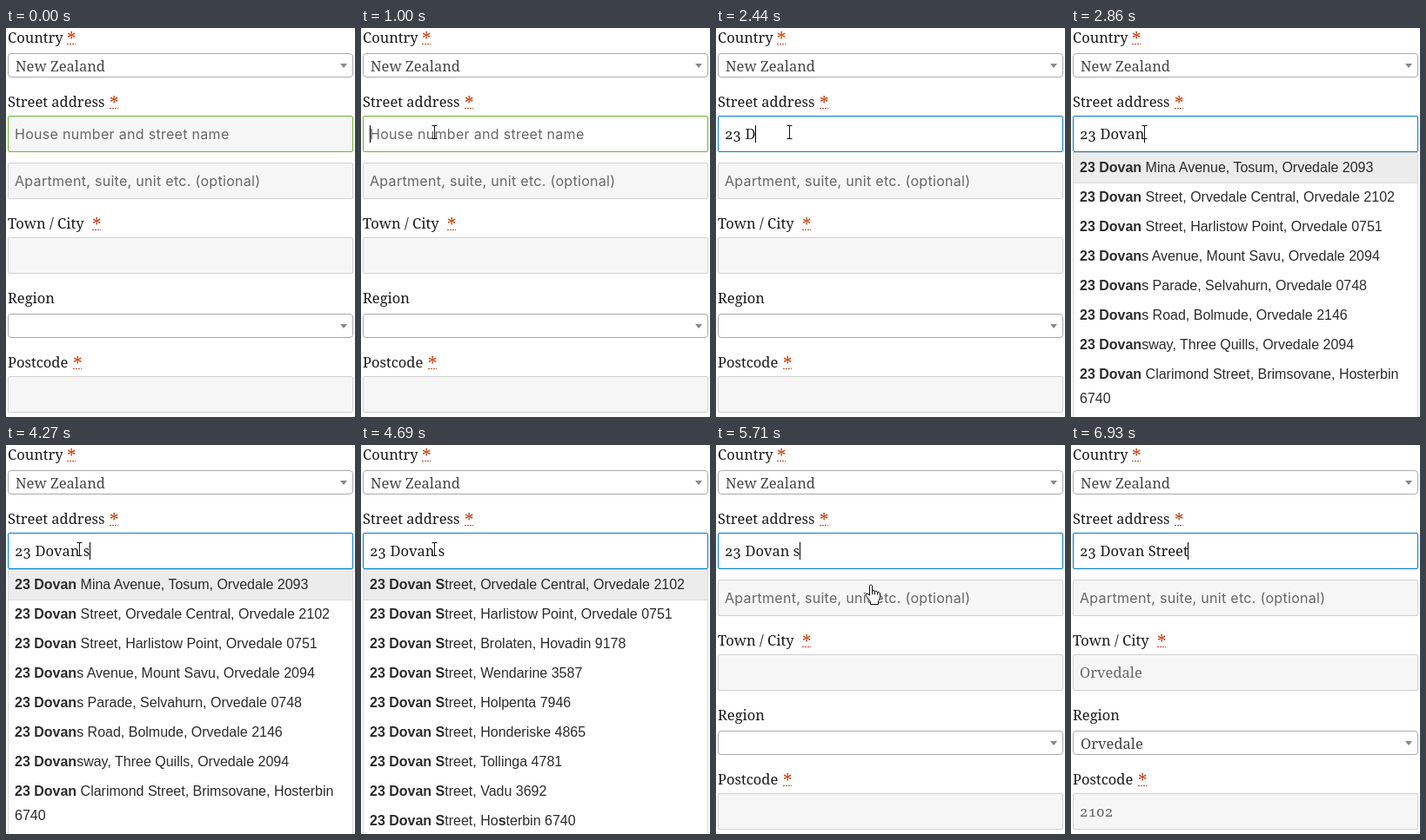
Recreate the animation shown at these times as an HTML page. Size 401 by 448 pixels, loop 7330 ms.

```html
<!DOCTYPE html>
<html lang="en">
<head>
<meta charset="utf-8">
<title>Address autocomplete</title>
<style>
  html, body { margin: 0; width: 100%; height: 100%; overflow: hidden; background: #fff; }
  svg { display: block; }
  text { white-space: pre; }
  .serif { font: 16.5px "Noto Serif", serif; font-variant-numeric: oldstyle-nums; }
  .hint { font: 16px Inter, sans-serif; letter-spacing: .3px; fill: #666; }
  .row { font: 16px "Liberation Sans", Arial, sans-serif; fill: #2b2b2b; }
  .star { font: 500 21px "Noto Serif", serif; fill: #c0400f; }
</style>
</head>
<body>
<svg id="stage" width="401" height="448" viewBox="0 0 401 448"></svg>
<script>
const LOOP = 7330;
const stage = document.getElementById('stage');

const typed = '23 Dovan';
const broadRows = [
  '*23 Dovan* Mina Avenue, Tosum, Orvedale 2093',
  '*23 Dovan* Street, Orvedale Central, Orvedale 2102',
  '*23 Dovan* Street, Harlistow Point, Orvedale 0751',
  '*23 Dovan*s Avenue, Mount Savu, Orvedale 2094',
  '*23 Dovan*s Parade, Selvahurn, Orvedale 0748',
  '*23 Dovan*s Road, Bolmude, Orvedale 2146',
  '*23 Dovan*sway, Three Quills, Orvedale 2094',
  '*23 Dovan* Clarimond Street, Brimsovane, Hosterbin',
];
const streetRows = [
  'Orvedale Central, Orvedale 2102', 'Harlistow Point, Orvedale 0751',
  'Brolaten, Hovadin 9178', 'Wendarine 3587', 'Holpenta 7946',
  'Honderiske 4865', 'Tollinga 4781', 'Vadu 3692', 'Ho*s*terbin 6740',
].map(place => '*23 Dovan S*treet, ' + place);

// Each step keeps the values of the one before it.
const steps = [
  [0, { value: '', border: '#6cb52d', fill: '#f6f6f6' }],
  [200, { beam: [112, 157] }],
  [400, { beam: [99, 138] }],
  [600, { beam: [90, 116] }],
  [800, { beam: [85, 106] }],
  [1000, { beam: [84, 120], fill: '#fff', caret: true }],
  [1620, { value: '2', border: '#007acc' }],
  [1820, { value: '23' }],
  [2220, { value: '23 ' }],
  [2440, { value: '23 D' }],
  [2650, { value: '23 Dov' }],
  [2860, { value: typed, rows: broadRows }],
  [3060, { caret: false }],
  [3480, { caret: true }],
  [4080, { value: typed + ' ' }],
  [4270, { value: typed + ' s' }],
  [4690, { rows: streetRows, caret: false }],
  [5090, { beam: [104, 130], caret: true }],
  [5300, { beam: null, hand: [140, 152] }],
  [5500, { hand: [171, 160] }],
  [5710, { rows: null }],
  [5910, { value: typed + ' Street', filled: true, caret: false }],
  [6320, { caret: true }],
  [6520, { hand: null }],
  [6730, { caret: false }],
  [6930, { caret: true }],
];
let last = {};
const scenes = steps.map(([start, change]) => ({ start, ...(last = { ...last, ...change }) }));

const text = (x, y, kind, str, color = '') =>
  `<text x="${x}" y="${y}" class="${kind}"${color && ` fill="${color}"`}>${str}</text>`;

const box = (y, h, fill, border, r) =>
  `<rect x="2.5" y="${y + .5}" width="396" height="${h - 1}" rx="${r}" fill="${fill}" stroke="${border}"/>`;

const field = (y, fill = '#f6f6f6', border = '#d1d1d1') => box(y, 42, fill, border, 1.5);

const select = (y, value) => box(y, 28, '#fff', '#aaa', 3.5)
  + `<path d="M384 ${y + 12}h8l-4 5z" fill="#888"/>` + text(11, y + 21, 'serif', value, '#444');

function label(y, name, starX) {
  const star = starX ? text(starX, y + 4, 'star', '*')
    + `<path d="M${starX} ${y + 1.5}h10" stroke="#c0400f" stroke-dasharray="2 1"/>` : '';
  return text(2, y, 'serif', name, '#1a1a1a') + star;
}

function dropdown(rows) {
  const bold = row => row.replace(/\*(.+?)\*/g, '<tspan font-weight="700">$1</tspan>');
  return '<path d="M2.5 449V143.5H398.5V449" fill="#fff" stroke="#d6d6d6"/>'
    + '<path d="M3 144h395v34H3z" fill="#ececec"/><path d="M3 178.5h395" stroke="#ddd"/>'
    + rows.map((row, i) => text(10, 166 + 34 * i, 'row', bold(row))).join('')
    + (rows === broadRows ? text(10, 432, 'row', '6740') : '');
}

const beam = ([x, y]) =>
  `<path d="M${x - 2.5} ${y - 7.5}h6m-3 0v15m-3 0h6" fill="none" stroke="#111"/>`;

const hand = ([x, y]) => `<path transform="translate(${x} ${y})" fill="#fff" stroke="#111"
  stroke-linejoin="round" d="M5.5 13V2Q7 -.5 8.5 2V8Q10 6 11.5 8.5Q13 7 14.5 9.5Q16.5 8.5 17.5 11
  V16L15.5 20V23.5H6.5V20.5L1.5 14Q0 11.5 2 11Q3.5 11 5.5 13.5M8.5 8v4M11.5 8.5v4M14.5 9.5v3"/>`;

function draw(s) {
  const { filled } = s;
  stage.innerHTML = label(17, 'Country', 70) + select(29, 'New Zealand')
    + label(91, 'Street address', 119) + field(101, s.fill, s.border)
    + (s.value ? '' : text(10, 128, 'hint', 'House number and street name'))
    + `<text id="entry" x="10" y="128" class="serif" fill="#1a1a1a">${s.value}</text>`
    + field(155) + text(10, 182, 'hint', 'Apartment, suite, unit etc. (optional)')
    + label(231, 'Town / City', 99) + field(241)
    + label(317, 'Region') + select(329, filled ? 'Orvedale' : '')
    + label(391, 'Postcode', 77) + field(401)
    + (filled ? text(10, 268, 'serif', 'Orvedale', '#666') + text(10, 428, 'serif', '2102', '#666') : '')
    + (s.rows ? dropdown(s.rows) : '')
    + '<path id="caret" stroke="#000"/>'
    + (s.beam ? beam(s.beam) : '') + (s.hand ? hand(s.hand) : '');
  if (s.caret) {
    const width = s.value ? document.getElementById('entry').getComputedTextLength() : 0;
    document.getElementById('caret').setAttribute('d', `M${Math.floor(10 + width) + .5} 112v20`);
  }
}

let shown;
const begin = performance.now();
function tick() {
  const t = (performance.now() - begin) % LOOP;
  const scene = scenes.findLast(s => s.start <= t);
  if (scene !== shown) draw(shown = scene);
  requestAnimationFrame(tick);
}
tick();
</script>
</body>
</html>
```
